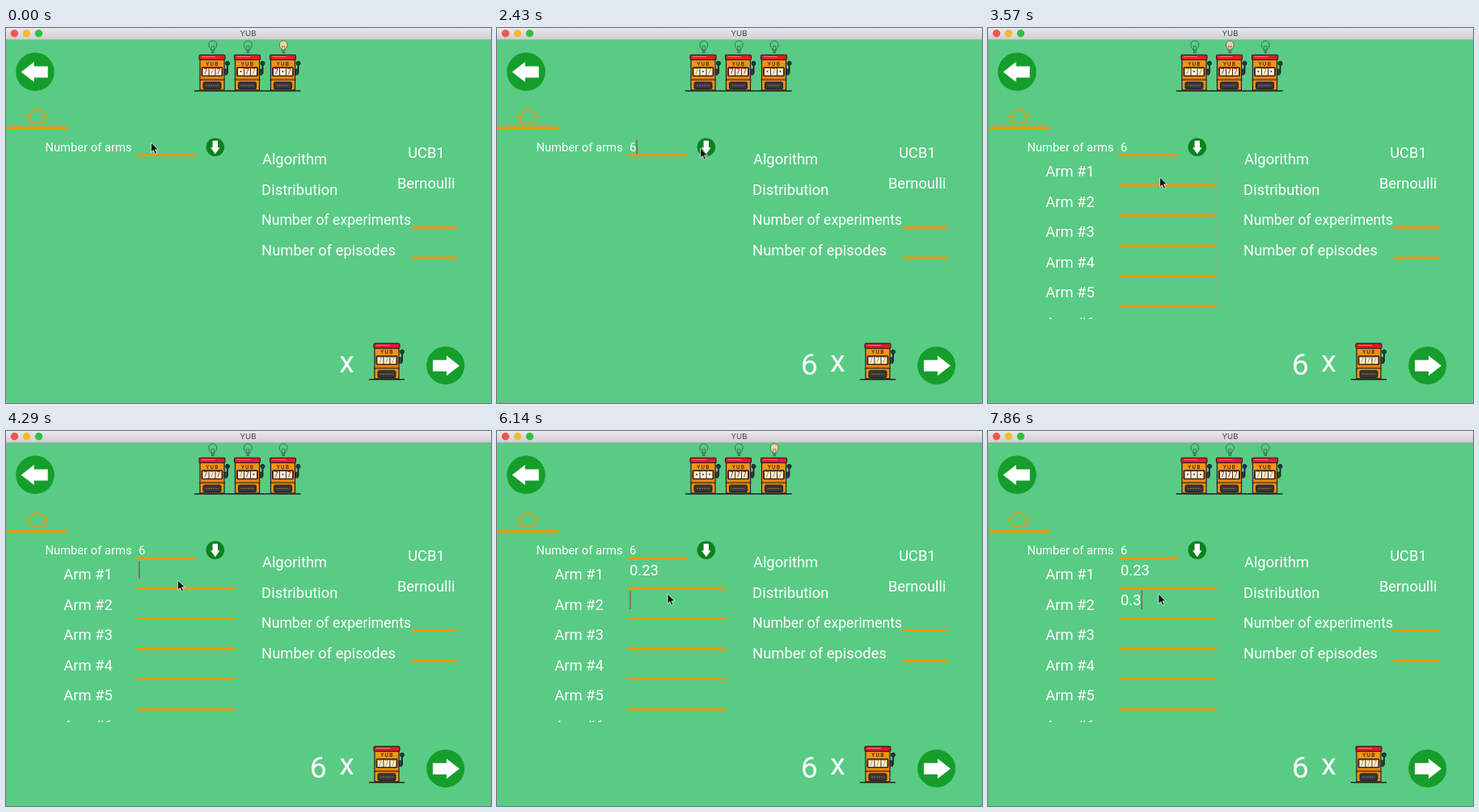
Write an HTML page that moves like this. It is 600x465 px and loops after 8000 ms.

```html
<!DOCTYPE html>
<html lang="en">
<head>
<meta charset="utf-8">
<title>Bandit setup</title>
<style>
  html, body { margin: 0; width: 100%; height: 100%; overflow: hidden; background: #59cb84; }
  svg { display: block; width: 100%; height: 100%; }
  text { font-family: Roboto, sans-serif; fill: #fff; white-space: pre; }
  .machine text { font-weight: 500; text-anchor: middle; }
  .rule { stroke: #f0960f; stroke-width: 2.8; }
</style>
</head>
<body>
<svg viewBox="0 0 600 465" xmlns="http://www.w3.org/2000/svg">
  <defs>
    <linearGradient id="chrome" x2="0" y2="1">
      <stop stop-color="#ebe9eb"/><stop offset="1" stop-color="#cfcdcf"/>
    </linearGradient>
    <clipPath id="listArea"><rect x="40" y="159" width="250" height="202"/></clipPath>
    <!-- Cabinet is 45 wide and 47 high, lever on the right -->
    <g id="cabinet" stroke="#1d2023">
      <path d="M37 23.5h4V13" fill="none" stroke-width="1.8"/>
      <rect x="37.5" y="19" width="3" height="7" fill="#39424a" stroke-width=".8"/>
      <circle cx="41" cy="11.8" r="2.5" fill="#183f48" stroke-width="1"/>
      <rect x="7" y="7" width="30" height="38" fill="#f7930f" stroke-width="1.2"/>
      <rect x="6" y="1.3" width="32" height="6.2" rx="1.5" fill="#e3192b" stroke-width="1.1"/>
      <path d="M9 3.6h17" stroke="#ff7b79" stroke-width="1"/>
      <rect x="9" y="16.8" width="26" height="11" rx="1" fill="#4a2c18" stroke-width=".9"/>
      <path d="M7.5 30.8h29" stroke="#c95a0c" stroke-width="1"/>
      <path d="M6 32.3h32" stroke-width="1.1"/>
      <rect x="11" y="35" width="22" height="8.6" rx="1.5" fill="#34363a" stroke-width="1"/>
      <path d="M14 39.3h16" stroke="#85755e" stroke-width="1.2" stroke-dasharray="2 1"/>
      <path d="M0 46h44" stroke-width="1.5"/>
    </g>
    <g id="bulb" stroke="#2c5b48" stroke-width=".8">
      <path d="M-2.2 6.5C-2.2 4-5 3.4-5 -.2A5 5 0 0 1 5-.2C5 3.4 2.2 4 2.2 6.5z"/>
      <path d="M-1.2 6L-1.8 1L0 2.2L1.8 1L1.2 6" fill="none" stroke-width=".6"/>
      <path d="M-2 8H2M-1.7 9.6H1.7" fill="none" stroke-width="1"/>
    </g>
    <path id="arrow" fill="#fff" d="M16.5-7H-.5v-5.5L-16.5 0L-.5 12.5V7H16.5z"/>
  </defs>

  <rect width="600" height="465" fill="#59cb84"/>
  <rect width="600" height="14.5" fill="url(#chrome)"/>
  <path d="M0 14.5h600" stroke="#aaa9aa" stroke-width=".8"/>
  <circle cx="10.5" cy="6.8" r="4.7" fill="#f4544d"/>
  <circle cx="25.5" cy="6.8" r="4.7" fill="#f6b92c"/>
  <circle cx="40.5" cy="6.8" r="4.7" fill="#2dc140"/>
  <text x="299.5" y="10.4" font-size="9.6" text-anchor="middle" style="fill:#454345;font-family:Inter,sans-serif">YUB</text>

  <circle cx="36" cy="54.3" r="23.8" fill="#159e2b"/>
  <use href="#arrow" x="35.2" y="54.6"/>
  <circle cx="543.7" cy="418.5" r="23.5" fill="#159e2b"/>
  <use href="#arrow" transform="translate(544.5 418.7) rotate(180)"/>
  <circle cx="258.8" cy="147.8" r="11.3" fill="#0d811f"/>
  <use href="#arrow" transform="translate(258.8 148) rotate(-90) scale(.5 .46)"/>

  <path d="M25 110L38.2 99.8L51.3 110H47.3V118H29.2V110z" fill="none" stroke="#e8981a" stroke-width="1.5"/>
  <path d="M1 124H76" class="rule" style="stroke-width:4"/>

  <g id="form"></g>
  <g id="list" clip-path="url(#listArea)"></g>
  <path id="scrollbar" d="M282.2 160V338" stroke="#99a79d" stroke-width="1.4" stroke-dasharray="3 1"/>
  <g id="fields"></g>
  <path id="caret" stroke="#a8403a" stroke-width="1.2"/>
  <text id="count" x="375.8" y="430" font-size="37.5">6</text>
  <text id="times" x="412.2" font-size="37.5">x</text>
  <g id="machines"></g>
  <path id="pointer" d="M0 0V12.2L2.9 9.6L4.9 14.2L7 13.3L5 8.8H8.8z" fill="#111" stroke="#fff" stroke-width=".7"/>
</svg>

<script>
const LOOP = 8000, STEP = 1000 / 7;
const BIG = 18.4, SMALL = 14.75;
const $ = id => document.getElementById(id);

function add(parent, tag, attrs, content = '') {
  const node = document.createElementNS('http://www.w3.org/2000/svg', tag);
  for (const key in attrs) node.setAttribute(key, attrs[key]);
  node.textContent = content;
  return parent.appendChild(node);
}
const label = (parent, x, y, size, content) =>
  add(parent, 'text', { x, y, 'font-size': size }, content);
const rule = (parent, x1, x2, y) =>
  add(parent, 'path', { d: `M${x1} ${y}H${x2}`, class: 'rule' });

// Static form
const form = $('form'), list = $('list');
label(form, 48.4, 153.2, SMALL, 'Number of arms');
rule(form, 162, 235, 157.6);
label(form, 316.9, 169.4, BIG, 'Algorithm');
label(form, 316.1, 206.9, BIG, 'Distribution');
label(form, 316.1, 244.4, 17.65, 'Number of experiments');
label(form, 316.1, 281.9, BIG, 'Number of episodes');
label(form, 497.2, 161.4, BIG, 'UCB1');
label(form, 483.9, 198.9, BIG, 'Bernoulli');
rule(form, 501.5, 558, 247.5);
rule(form, 501.5, 558, 285);
for (let i = 0; i < 6; i++) {
  const y = 184 + i * 37.5;
  label(list, 71.2, y, BIG, 'Arm #' + (i + 1));
  rule(list, 162, 283, y + 11);
}

// Slot machines: three spinning on top, one at rest below
function machine(x, y) {
  const g = add($('machines'), 'g', { class: 'machine', transform: `translate(${x} ${y})` });
  add(g, 'use', { href: '#cabinet' });
  add(g, 'text', { x: 22.6, y: 14.6, 'font-size': 6.8, 'letter-spacing': 1.4, style: 'fill:#3a2410' }, 'YUB');
  return [0, 1, 2].map(i => {
    add(g, 'rect', { x: 10.5 + i * 8, y: 18, width: 7, height: 8.6, fill: '#fbf0dc' });
    return add(g, 'text', { x: 14 + i * 8, y: 25.4, 'font-size': 8.4 }, '7');
  });
}
const reels = [233, 276.5, 320.5].flatMap(x => machine(x, 32));
machine(449, 389.8).forEach(reel => reel.style.fill = '#c99a13');
const bulbs = [255.8, 299.3, 343.2].map(x => add($('machines'), 'use', { href: '#bulb', x, y: 21 }));

// Typed fields: focus span and the moment each value appears
const fields = [
  { x: 164, y: 153.2, size: SMALL, top: 139, bottom: 157, focus: [1000, 2560], keys: [[2000, '6']] },
  { x: 164, y: 178.8, size: BIG, top: 161, bottom: 183.5, focus: [4000, 5990],
    keys: [[4570, '0'], [4850, '0.'], [5000, '0.2'], [5430, '0.23']] },
  { x: 164, y: 216.3, size: BIG, top: 198.5, bottom: 221, focus: [6000, 8000],
    keys: [[7140, '0'], [7430, '0.'], [7710, '0.3']] }
];
for (const f of fields) f.node = label($('fields'), f.x, f.y, f.size, '');

const pointerPath = [
  [0, 179.5, 142], [140, 180, 142], [710, 191, 148], [2000, 191, 148], [2430, 251.5, 149],
  [2860, 251.5, 149], [3430, 212.5, 185], [5570, 212.5, 185], [5860, 211, 202], [LOOP, 211, 202]
];
function pointerAt(t) {
  const i = pointerPath.findIndex(p => p[0] > t);
  const [t0, x0, y0] = pointerPath[i - 1], [t1, x1, y1] = pointerPath[i];
  const p = (t - t0) / (t1 - t0), k = p * p * (3 - 2 * p);
  return [x0 + (x1 - x0) * k, y0 + (y1 - y0) * k];
}

const BULB_PERIOD = 2047;
const bulbPeaks = [960, 1510, 2050];
const show = (node, on) => node.setAttribute('visibility', on ? 'visible' : 'hidden');

function render(ms) {
  const step = Math.floor((ms % LOOP + 4) / STEP);
  const t = Math.min(step * STEP + 4, LOOP - 1);

  bulbs.forEach((bulb, i) => {
    const away = Math.abs((t - bulbPeaks[i] + 2.5 * BULB_PERIOD) % BULB_PERIOD - BULB_PERIOD / 2);
    bulb.setAttribute('fill', away < 85 ? (i === 1 ? '#f2cda9' : '#ffd6a0') : 'none');
  });
  reels.forEach((reel, i) => {
    const pick = (step * (i % 3 + 1) + i * 5) % 4;
    reel.textContent = pick === 3 ? '•' : '7';
    reel.style.fill = ['#d5222b', '#c9871b', '#d5222b', '#51301b'][pick];
  });

  let caret = '';
  for (const f of fields) {
    const typed = f.keys.filter(k => k[0] <= t).pop();
    f.node.textContent = typed ? typed[1] : '';
    const [start, end] = f.focus;
    if (t < start || t >= end) continue;
    const sinceEdit = t - (typed ? typed[0] : start);
    if (sinceEdit % 1000 < 500)
      caret = `M${f.x + .8 + f.node.getComputedTextLength()} ${f.top}V${f.bottom}`;
  }
  $('caret').setAttribute('d', caret);

  show($('count'), t >= 2000);
  $('times').setAttribute('y', t >= 2000 ? 426.4 : 427.3);
  show(list, t >= 2710);
  $('scrollbar').setAttribute('opacity', t < 2710 ? 0 : Math.max(0, Math.min(1, (4000 - t) / 400)));
  $('pointer').setAttribute('transform', `translate(${pointerAt(t)})`);
}

const begin = performance.now();
function tick() {
  render(performance.now() - begin);
  requestAnimationFrame(tick);
}
tick();
</script>
</body>
</html>
```
